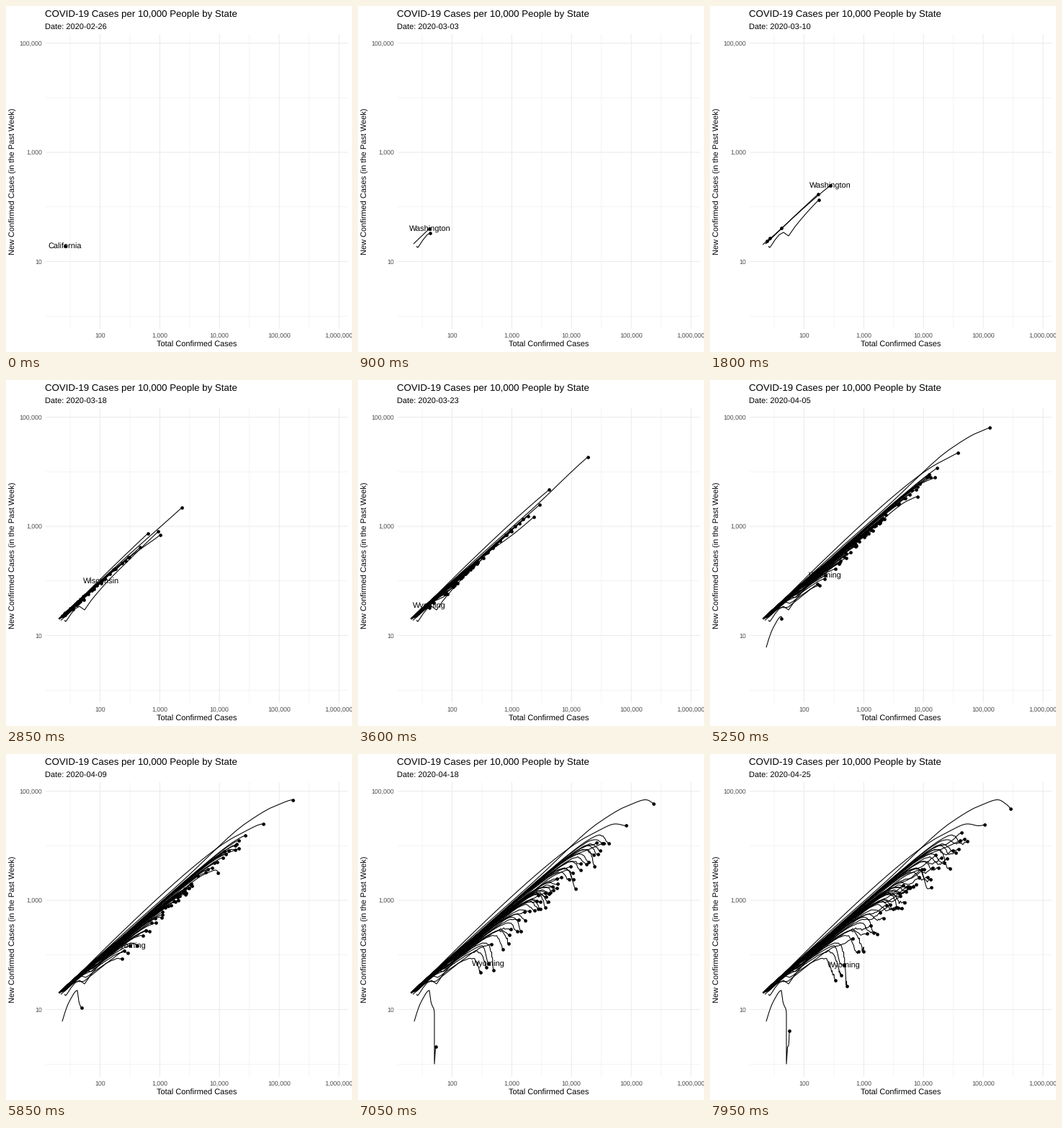
Recreate the animation shown at these times as a matplotlib script. Size 480 by 480 pixels, loop 8000 ms.

```python
import numpy as np
import matplotlib.pyplot as plt
from matplotlib.animation import FuncAnimation
from matplotlib.collections import LineCollection
from matplotlib.patches import Rectangle

plt.rcParams.update({"font.family": "Liberation Sans", "text.hinting": "none"})

SIZE, DPI = 480, 72
LEFT, RIGHT, TOP, BOTTOM = 55, 474, 39, 448
X_DECADE, Y_DECADE = 82.85, 75.75
INTERVAL, FRAMES, HOLD = 50, 160, 3
DAYS_PER_STEP = 223 / 199
LAST_DAY = 59.4
FIRST_DATE = np.datetime64("2020-02-26")
STATES = 46

# Leading and labelled curves as a few (day, x, y) points on the stage
KEY_CURVES = {
    "New York": [(9, 77, 330), (13.45, 150, 261), (21.3, 244, 177), (28, 330, 98),
                 (33.6, 369, 74), (43.7, 398.5, 63.5), (52.67, 410, 69), (59.4, 417, 76)],
    "New Jersey": [(14, 77, 330), (33.6, 319, 114), (43.7, 357, 97),
                   (52.67, 372, 99.5), (59.4, 381, 98)],
    "California": [(0, 81.5, 333), (3, 83, 335), (7, 102, 314), (8, 109, 319),
                   (9, 118, 306), (13.45, 151, 269), (33.6, 291, 144.5),
                   (43.7, 323.5, 131), (59.4, 347.5, 120)],
    "Washington": [(5, 77, 330), (13.45, 167, 249), (21.3, 214, 215), (33.6, 273, 168),
                   (41, 291, 161), (52.67, 302, 187), (59.4, 307, 185)],
    "Wisconsin": [(16.5, 77, 330), (21.3, 132, 279), (43.7, 254, 186), (59.4, 276, 184)],
    "Wyoming": [(24, 78, 330), (33.6, 137, 285), (43.7, 172, 266),
                (52.67, 181, 291), (59.4, 186, 293)],
    "Virgin Islands": [(31, 78, 371), (34, 88, 343), (39, 99, 328), (40, 101, 343),
                       (47, 106, 362), (48, 106, 430), (50, 106, 430), (51, 107.5, 407),
                       (56, 109, 404), (59.4, 110, 384)],
}
LABELS = ("Wyoming", "Wisconsin", "Washington", "California")

rng = np.random.default_rng(19)


def x_px(total):
    return 130.5 + X_DECADE * (np.log10(total) - 2)


def y_px(recent):
    return 354.5 - Y_DECADE * (np.log10(recent) - 1)


def smooth(t, ts, vs):
    """Cubic curve through the points that never overshoots them."""
    ts, vs = np.asarray(ts, float), np.asarray(vs, float)
    h, d = np.diff(ts), np.diff(vs) / np.diff(ts)
    product, total = d[:-1] * d[1:], d[:-1] + d[1:]
    rising = product > 0
    inner = np.where(rising, 2 * product / np.where(rising, total, 1), 0)
    slopes = np.r_[2 * d[0] - inner[0], inner, 2 * d[-1] - inner[-1]]
    k = np.clip(np.searchsorted(ts, t, side="right") - 1, 0, len(h) - 1)
    u = (t - ts[k]) / h[k]
    return (vs[k] * (1 + 2 * u) * (1 - u) ** 2 + vs[k + 1] * u * u * (3 - 2 * u)
            + h[k] * u * (1 - u) * (slopes[k] * (1 - u) - slopes[k + 1] * u))


def key_path(points):
    ts, xs, ys = np.transpose(points)
    days = np.r_[ts[0], np.arange(np.floor(ts[0]) + 1, LAST_DAY), LAST_DAY]
    return np.column_stack([days, smooth(days, ts, xs), smooth(days, ts, ys)])


def state_path(rank):
    """Growth slows from 20 cases to a total set by rank (0 largest, 1 smallest)."""
    final = np.log(10) * np.interp(rank, (0, 0.44, 0.67, 0.89, 1),
                                   (4.73, 3.79, 3.54, 3.0, 2.52))
    late = 0.042 * (1 - 0.75 * rank ** 6) * np.exp(rng.normal(0, 0.4))
    middle = late + 0.012
    knots = np.array([final - 7 * late - 8.7 * middle, final - 7 * late, final])
    start = 20.8 - 1.45 * (knots[0] - np.log(500)) - rng.exponential(1)
    ts, vs = [start, 43.7, 52.4, LAST_DAY], [np.log(20), *knots]
    days = np.arange(np.ceil(start) - 7, LAST_DAY + 1)
    before = vs[0] + rng.uniform(0.25, 1.5) * (days - start)
    logs = np.where(days < start, before, smooth(np.maximum(days, start), ts, vs))
    total = np.exp(logs + rng.normal(0, 0.005, len(days)))
    recent = np.maximum(total[7:] - total[:-7], 1)
    return np.column_stack([days[7:], x_px(total[7:]), y_px(recent)])


paths = {name: key_path(points) for name, points in KEY_CURVES.items()}
paths.update({i: state_path(i / (STATES - 1)) for i in range(STATES)})


def revealed(path, t):
    past = path[path[:, 0] <= t, 1:]
    head = [np.interp(t, path[:, 0], path[:, i]) for i in (1, 2)]
    return np.vstack([past, head])


fig = plt.figure(figsize=(SIZE / DPI, SIZE / DPI), dpi=DPI, facecolor="white")
ax = fig.add_axes([0, 0, 1, 1])
ax.set(xlim=(0, SIZE), ylim=(SIZE, 0))
ax.axis("off")


def grid(value, vertical, width):
    xs, ys = ([value] * 2, [TOP, BOTTOM]) if vertical else ([LEFT, RIGHT], [value] * 2)
    ax.plot(xs, ys, color="#ebebeb", lw=width, snap=False, solid_capstyle="butt", zorder=0)


def write(x, y, text, size=11, color="black", **kwargs):
    return ax.text(x, y, text, fontsize=size, color=color,
                   **{"va": "baseline", **kwargs})


for power in range(2, 7):
    x = x_px(10 ** power)
    grid(x, True, 1.07)
    grid(x - X_DECADE / 2, True, 0.53)
    write(x, 460, f"{10 ** power:,}", 8.8, "#4d4d4d", ha="center")
for power in (1, 3, 5):
    y = y_px(10 ** power)
    grid(y, False, 1.07)
    grid(y + Y_DECADE, False, 0.53)
    write(50, y + 3.2, f"{10 ** power:,}", 8.8, "#4d4d4d", ha="right")

write(LEFT - 0.5, 15, "COVID-19 Cases per 10,000 People by State", 13.2)
subtitle = write(LEFT - 0.5, 32, "")
write(264.5, 473, "Total Confirmed Cases", ha="center")
write(13, 243.5, "New Confirmed Cases (in the Past Week)", rotation=90,
      rotation_mode="anchor", ha="center")

panel = Rectangle((LEFT, TOP), RIGHT - LEFT, BOTTOM - TOP, transform=ax.transData)
lines = ax.add_collection(LineCollection([], colors="black", linewidths=1.07, zorder=2),
                          autolim=False)
dots, = ax.plot([], [], "o", color="black", ms=4.7, mew=0, zorder=3)
label = write(0, 0, "", ha="center", zorder=4)
for artist in (lines, dots, label):
    artist.set_clip_path(panel)


def update(frame):
    t = frame // HOLD * DAYS_PER_STEP
    trails = {name: revealed(p, t) for name, p in paths.items() if p[0, 0] <= t}
    lines.set_segments(list(trails.values()))
    dots.set_data(*np.array([trail[-1] for trail in trails.values()]).T)
    name = next(name for name in LABELS if name in trails)
    x, y = trails[name][-1]
    label.set_position((x, y + 4))
    label.set_text(name)
    subtitle.set_text(f"Date: {FIRST_DATE + int(t)}")
    return lines, dots, label, subtitle


anim = FuncAnimation(fig, update, frames=FRAMES, interval=INTERVAL,
                     repeat=True, repeat_delay=0, blit=False)
plt.show()
```
